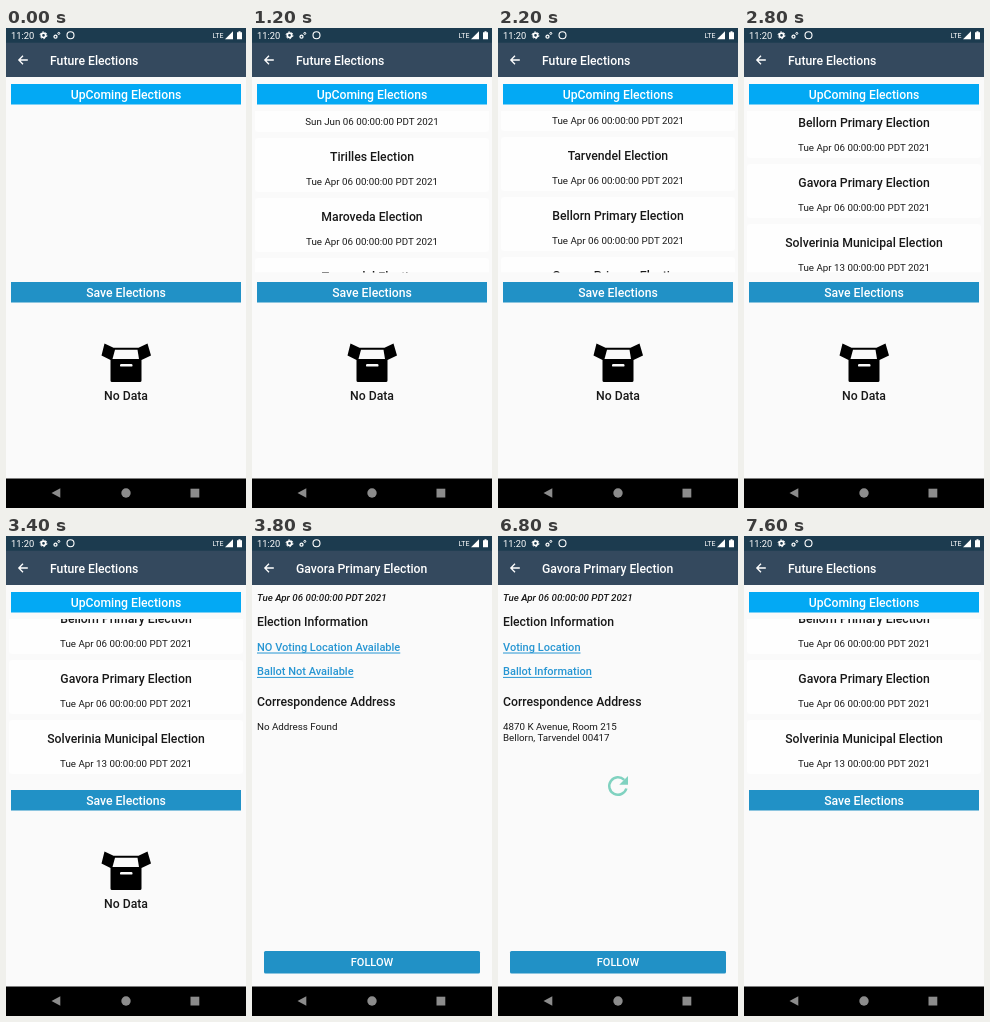
Animation of 240x480 px, one loop 8 s. Source, as an HTML page:

```html
<!DOCTYPE html>
<html lang="en">
<head>
<meta charset="utf-8">
<title>Future Elections</title>
<style>
  html, body { margin: 0; width: 100%; height: 100%; overflow: hidden; background: #fafafa; }
  svg { display: block; width: 100vw; height: 100vh; font-family: Roboto, sans-serif; }
  text { fill: #181818; white-space: pre; }
  .big { font-size: 12.22px; font-weight: 500; }
  .body { font-size: 9.78px; }
  .date { font-style: italic; font-weight: 500; }
  .link { font-size: 11px; font-weight: 500; fill: #2796d3; }
  .mid { text-anchor: middle; }
  .white { fill: #fff; }
  .card { fill: #fefefe; }
</style>
</head>
<body>
<svg viewBox="0 0 240 480" preserveAspectRatio="none">
  <defs>
    <clipPath id="listClip"><rect x="0" y="83" width="240" height="161.5"/></clipPath>
  </defs>
  <rect width="240" height="480" fill="#fafafa"/>

  <g id="listPage">
    <g clip-path="url(#listClip)"><g id="cards"></g></g>
    <rect x="5" y="56" width="230" height="20.5" fill="#03a9f4"/>
    <text class="big mid white" x="120" y="71.3">UpComing Elections</text>
    <rect x="5" y="254" width="230" height="20.5" fill="#2191c6"/>
    <text class="big mid white" x="120" y="269.3">Save Elections</text>
    <g id="noData">
      <path d="M98.5 315.5L107.5 319.8H132.5L141.5 315.5L145 327.5L135.5 332V352.5Q135.5 354 134 354H106Q104.5 354 104.5 352.5V332L95.5 327.5Z"/>
      <path d="M109 321.8H131.5L133 331H106.5Z" fill="#fafafa"/>
      <rect x="114" y="336" width="12.5" height="2.6" rx="1.2" fill="#fafafa"/>
      <text class="big mid" x="120" y="372.3">No Data</text>
    </g>
  </g>

  <g id="detailPage">
    <text class="body date" x="5" y="64.5">Tue Apr 06 00:00:00 PDT 2021</text>
    <text class="big" x="5" y="90.2">Election Information</text>
    <text class="link" x="5" y="115" id="voting"></text>
    <text class="link" x="5" y="139.4" id="ballot"></text>
    <path id="underlines" stroke="#2796d3" stroke-width="1"/>
    <text class="big" x="5" y="170.4">Correspondence Address</text>
    <text class="body" x="5" y="193.8" id="address1"></text>
    <text class="body" x="5" y="205.3" id="address2"></text>
    <g id="spinner">
      <path d="M16.95 7.05A7 7 0 1 0 18.7 14" fill="none" stroke="#80d2c0" stroke-width="2"/>
      <path d="M13 11H20V4Z" fill="#80d2c0"/>
    </g>
    <rect x="12" y="415" width="216" height="22.5" rx="1.5" fill="#2191c6"/>
    <text class="link mid white" x="120" y="430.3" style="fill:#fff">FOLLOW</text>
  </g>

  <rect width="240" height="49" fill="#34495e"/>
  <rect width="240" height="14.7" fill="#1c3b4f"/>
  <g id="statusBar" fill="none" stroke="#fff">
    <text class="white" x="5" y="11" font-size="9.3" stroke="none">11:20</text>
    <circle cx="37.5" cy="7.3" r="2.2" stroke-width="1.7"/>
    <circle cx="37.5" cy="7.3" r="3.4" stroke-width="1" stroke-dasharray="1.78"/>
    <circle cx="49.5" cy="8.7" r="1.5" stroke-width="1.3"/>
    <circle cx="52.8" cy="5.4" r="1" stroke-width="1"/>
    <circle cx="64.5" cy="7.3" r="3.5" stroke-width="1.1"/>
    <text class="white" x="206.5" y="10.2" font-size="7" stroke="none">LTE</text>
    <path d="M219 11.2L227 3.2V11.2Z" fill="#fff" stroke="none"/>
    <path d="M231 4.2H232.5V3.2H234.5V4.2H236V11.3H231Z" fill="#fff" stroke="none"/>
    <path d="M21.8 32H13M17 27.7L12.8 32L17 36.3" stroke-width="1.3"/>
  </g>
  <text class="big white" x="44" y="36.5" id="title"></text>

  <rect y="450.5" width="240" height="29.5"/>
  <g fill="#8c8c8c">
    <path d="M45.5 465L54.3 460.2V469.8Z"/>
    <circle cx="120" cy="465" r="4.7"/>
    <rect x="184.5" y="460.7" width="8.8" height="8.8"/>
  </g>
</svg>
<script>
const LOOP = 8000, STEP = 200;
const LIST_LOADED = 400, OPEN = 3800, SPIN = 4000, DETAIL_LOADED = 5400, BACK = 7000;
const FIRST_TITLE = 108, PITCH = 60;

const elections = [
  ["Pilot Test", "Sun Jun 06"],
  ["Tirilles", "Tue Apr 06"],
  ["Maroveda", "Tue Apr 06"],
  ["Tarvendel", "Tue Apr 06"],
  ["Bellorn Primary", "Tue Apr 06"],
  ["Gavora Primary", "Tue Apr 06"],
  ["Solverinia Municipal", "Tue Apr 13"]
];

// [time, list offset]
const scrollKeys = [
  [0, 0], [800, 0], [1000, 12], [1200, 39], [1400, 76], [1600, 110], [1800, 138],
  [2000, 154], [2200, 160], [2400, 160], [2600, 200], [2800, 253], [3000, 264], [3200, 265]
];

const $ = id => document.getElementById(id);
const show = (id, on) => { $(id).style.display = on ? "" : "none"; };
const setText = (id, value) => { if ($(id).textContent !== value) $(id).textContent = value; };

$("cards").innerHTML = elections.map(([name, day], i) => {
  const y = FIRST_TITLE + i * PITCH;
  return `<rect class="card" x="3" y="${y - 19}" width="234" height="54" rx="3"/>
    <text class="big mid" x="120" y="${y + 4.4}">${name} Election</text>
    <text class="body mid" x="120" y="${y + 28}">${day} 00:00:00 PDT 2021</text>`;
}).join("");

function scrollAt(t) {
  const next = scrollKeys.findIndex(key => key[0] > t);
  if (next < 0) return scrollKeys[scrollKeys.length - 1][1];
  const [t0, y0] = scrollKeys[next - 1], [t1, y1] = scrollKeys[next];
  return y0 + (y1 - y0) * (t - t0) / (t1 - t0);
}

function drawList(t) {
  show("cards", t >= LIST_LOADED);
  show("noData", t < OPEN);
  $("cards").setAttribute("transform", `translate(0 ${-scrollAt(t)})`);
}

function drawDetail(t) {
  const loaded = t >= DETAIL_LOADED;
  setText("voting", loaded ? "Voting Location" : "NO Voting Location Available");
  setText("ballot", loaded ? "Ballot Information" : "Ballot Not Available");
  setText("address1", loaded ? "4870 K Avenue, Room 215" : "No Address Found");
  setText("address2", loaded ? "Bellorn, Tarvendel 00417" : "");
  const lineEnd = id => 5 + $(id).getComputedTextLength();
  $("underlines").setAttribute("d", `M5 117H${lineEnd("voting")}M5 141.4H${lineEnd("ballot")}`);
  show("spinner", t >= SPIN);
  const angle = (t - 6800) * 0.36;
  $("spinner").setAttribute("transform",
    `translate(120 250) rotate(${angle}) scale(1.25) translate(-12 -12)`);
}

function render(t) {
  const detail = t >= OPEN && t < BACK;
  show("listPage", !detail);
  show("detailPage", detail);
  setText("title", detail ? "Gavora Primary Election" : "Future Elections");
  if (detail) drawDetail(t);
  else drawList(t);
}

const start = performance.now();
function tick() {
  const t = (performance.now() - start) % LOOP;
  render(Math.floor(t / STEP) * STEP);
  requestAnimationFrame(tick);
}
tick();
</script>
</body>
</html>
```
